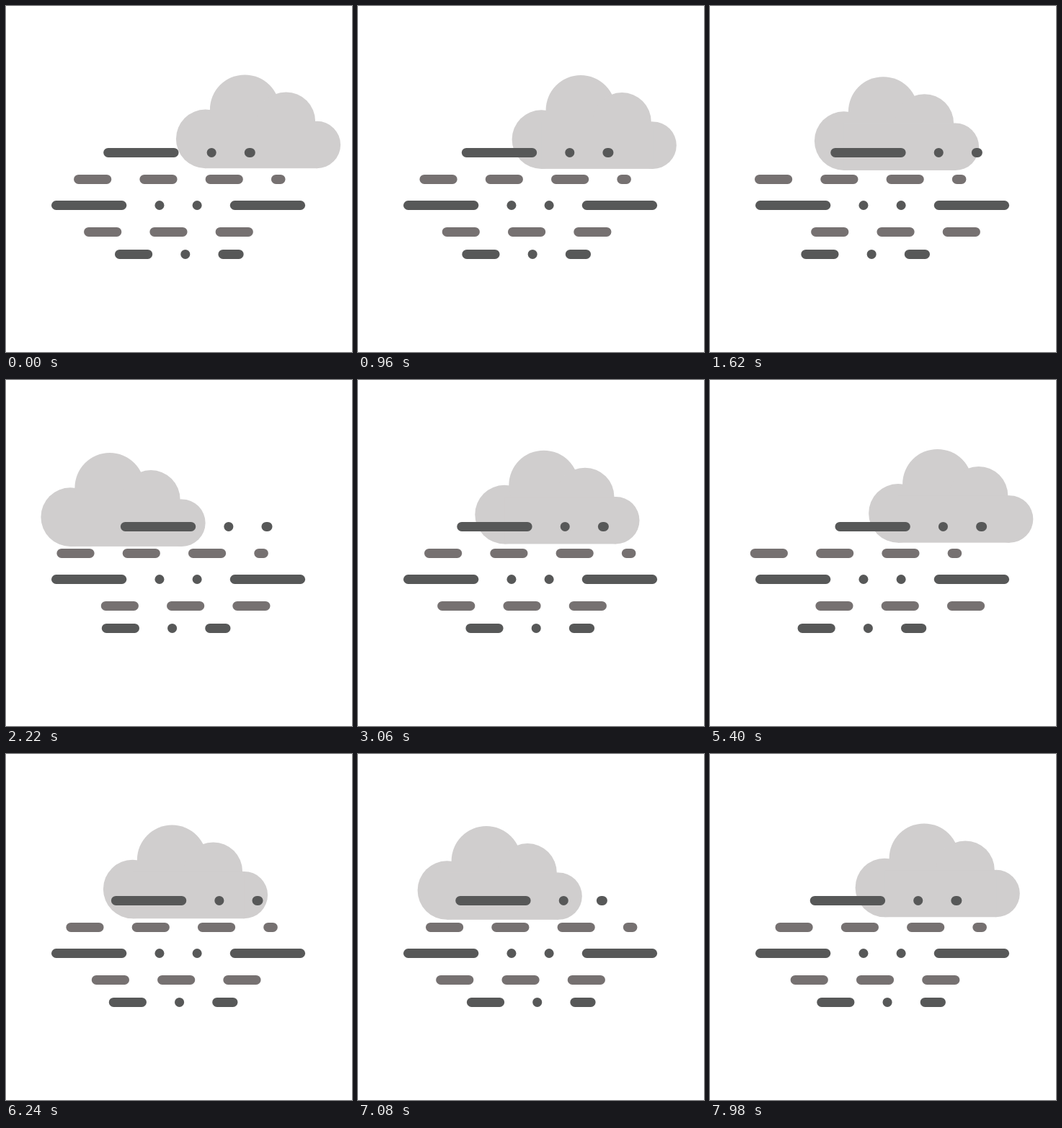
Recreate the animation shown at these times as an HTML page. Size 480 by 480 pixels, loop 8 s.

```html
<!DOCTYPE html>
<html lang="en">
<head>
<meta charset="utf-8">
<title>Cloud and wind</title>
<style>
  html, body { margin: 0; width: 100%; height: 100%; overflow: hidden; background: #fff; }
  svg { display: block; width: 100vw; height: 100vh; }
</style>
</head>
<body>
<svg id="stage" viewBox="0 0 480 480">
  <g id="cloud" fill="#d0cece">
    <circle cx="276.7" cy="184.4" r="40.8"/>
    <circle cx="331.3" cy="143.8" r="48.4"/>
    <circle cx="388.5" cy="160" r="40.6"/>
    <circle cx="431.4" cy="192.5" r="32.7"/>
    <rect x="276.7" y="160" width="154.7" height="65.2"/>
  </g>
</svg>
<script>
const LOOP = 8000, STEP = 60;
const CLOUD_SWING = 2275, WIND_SWING = 1820;
const THICK = 13.04, GAP = 3 * THICK;
const DARK = '#575858', WARM = '#767171';

// Dash lengths are in multiples of the line thickness.
const rows = [
  { x: 135.2, y: 203.4, color: DARK, reach: 41,  dashes: [8, 1, 1.15] },
  { x: 94.1,  y: 240.4, color: WARM, reach: -41, dashes: [4, 4, 4, 1.5] },
  { x: 63,    y: 276.5, color: DARK, reach: 0,   dashes: [8, 1, 1, 8] },
  { x: 108.1, y: 313.4, color: WARM, reach: 41,  dashes: [4, 4, 4] },
  { x: 151,   y: 344.4, color: DARK, reach: -31.5, dashes: [4, 1, 2.7] }
];

const stage = document.getElementById('stage');
const cloud = document.getElementById('cloud');

function addSvg(parent, tag, attrs) {
  const node = document.createElementNS('http://www.w3.org/2000/svg', tag);
  for (const key in attrs) node.setAttribute(key, attrs[key]);
  return parent.appendChild(node);
}

for (const row of rows) {
  row.group = addSvg(stage, 'g', { fill: row.color });
  let x = row.x;
  for (const units of row.dashes) {
    const width = units * THICK;
    addSvg(row.group, 'rect', {
      x, y: row.y - THICK / 2, width, height: THICK, rx: THICK / 2
    });
    x += width + GAP;
  }
}

// Soft at rest, sharp rebound at full reach.
function swing(time, half) {
  const phase = (time / half) % 2;
  const p = phase > 1 ? 2 - phase : phase;
  return p - Math.sin(Math.PI * p) / Math.PI;
}

function move(node, x, y) {
  node.setAttribute('transform', `translate(${x.toFixed(2)} ${y.toFixed(2)})`);
}

function draw(time) {
  const drift = swing(time, CLOUD_SWING);
  const wind = swing(time, WIND_SWING);
  move(cloud, -197 * drift, 6 * drift);
  for (const row of rows) move(row.group, row.reach * wind, 0);
}

const start = performance.now();
function tick() {
  const time = (performance.now() - start) % LOOP;
  draw(Math.floor(time / STEP) * STEP);
  requestAnimationFrame(tick);
}
tick();
</script>
</body>
</html>
```
